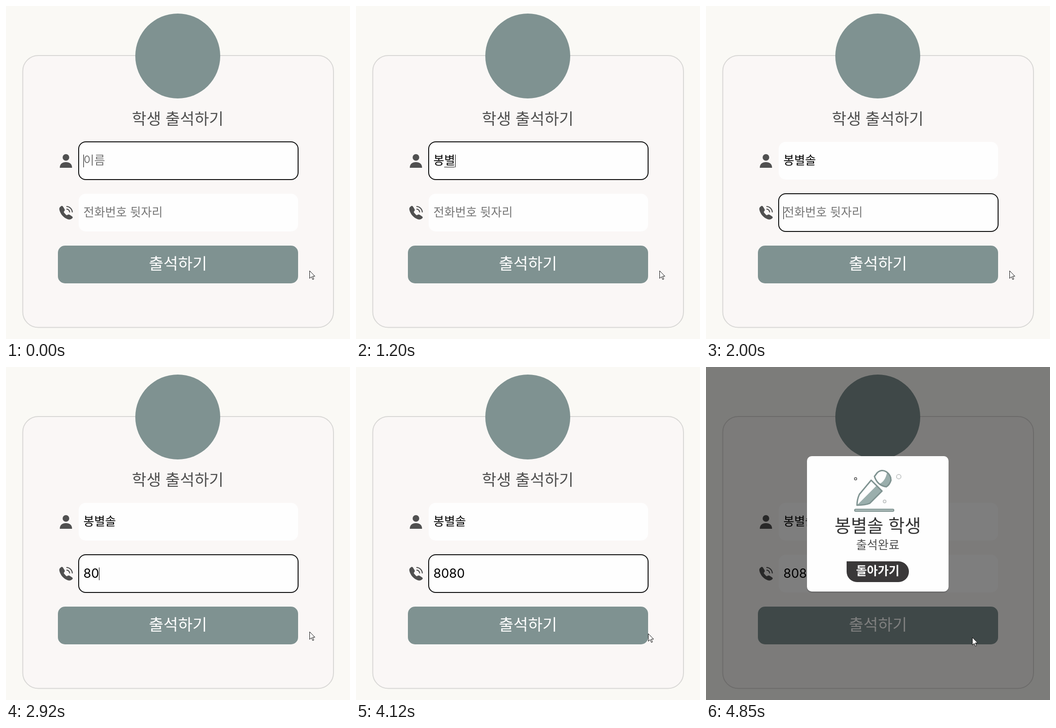
Animation of 729 by 706 pixels, one loop 5780 ms. Source, as an HTML page:

```html
<!DOCTYPE html>
<html lang="ko">
<head>
<meta charset="utf-8">
<style>
  html, body { margin: 0; width: 100%; height: 100%; overflow: hidden; background: #faf9f5; }
  svg { display: block; width: 100vw; height: 100vh; }
  text { font: 500 25px "Noto Sans CJK KR", "Noto Sans CJK", sans-serif; white-space: pre; }
  .hint { fill: #757575; }
  .digits { font: 400 26.6px Inter, sans-serif; }
  .title { font-size: 33.5px; text-anchor: middle; }
  .mid { text-anchor: middle; }
  .field { fill: #fefefe; stroke-width: 2; }
  .icon { fill: #505050; }
  .line { fill: none; stroke: #7f9391; stroke-width: 3; stroke-linejoin: round; }
</style>
</head>
<body>
<svg viewBox="0 0 729 706">
  <rect width="729" height="706" fill="#faf9f5"/>
  <rect x="35.5" y="105" width="658.5" height="576.5" rx="33" fill="#faf7f6" stroke="#d9d8d6" stroke-width="2"/>
  <circle cx="364" cy="106" r="90" fill="#7f9291"/>
  <text class="title" x="364" y="251" fill="#505050">학생 출석하기</text>

  <g class="icon">
    <circle cx="127" cy="321" r="7"/>
    <path d="M114 343C114 335 119 331 127 331S140 335 140 343Z"/>
    <path d="M116 425q3-2.500 5 .5l3 5q1.500 3-1 5-1 1 0 2.500l4 4.500q1.500 1.500 3 .5 3-2 5.500 0l4.500 3q2.500 2 .5 4-4 4-10 2-8-3-13-10-5-8-4.500-13 .5-2.500 3-4Z"/>
    <path d="M128 425A12.500 12.500 0 0 1 140.500 437.500M128 430.500A7 7 0 0 1 135 437.500" fill="none" stroke="#505050" stroke-width="2.200"/>
  </g>

  <rect id="nameField" class="field" x="154" y="288" width="465" height="80" rx="15"/>
  <rect id="phoneField" class="field" x="154" y="398" width="465" height="80" rx="15"/>
  <text id="nameHint" class="hint" x="164" y="336">이름</text>
  <text id="phoneHint" class="hint" x="164" y="446">전화번호 뒷자리</text>
  <text id="name" x="164" y="336"></text>
  <text id="phone" class="digits" x="164" y="446.500"></text>
  <rect id="underline" y="341" height="1"/>
  <rect id="caret" width="1" height="27"/>

  <rect id="button" x="110" y="508" width="509" height="80" rx="15"/>
  <text class="title" x="364.500" y="557.500" fill="#fff">출석하기</text>

  <g id="popup">
    <rect width="729" height="706" fill="#000" opacity=".5"/>
    <rect x="214" y="192" width="300" height="287" rx="10" fill="#000" opacity=".12"/>
    <rect x="214" y="189" width="300" height="287" rx="10" fill="#fefefe"/>
    <path d="M372 263 347 290Q340 292 320 293L361 252Z" fill="#9aaeac"/>
    <path d="M392 232Q395 242 383 254 374 254 367 248Q380 243 384 222Z" fill="#9aaeac"/>
    <path class="line" d="M350 240 373 263 347 289Q338 293 320 293 320 281 325 270ZM357 232 363 224Q372 216 382 222 392 229 392 240 389 250 382 254 363 251 357 232Z"/>
    <rect class="line" x="315" y="301.500" width="83" height="4.500" rx="2.200" style="fill:#aebdbb;stroke-width:2"/>
    <g fill="none" stroke="#b8bcbc" stroke-width="1.500">
      <circle cx="317" cy="237" r="2.500" stroke="#555"/>
      <circle cx="408.500" cy="232.500" r="4.700"/>
      <circle cx="378.500" cy="285" r="3"/>
    </g>
    <text class="mid" x="364" y="349.500" fill="#333" style="font-size:37.500px">봉별솔 학생</text>
    <text class="mid" x="364" y="386" fill="#505050">출석완료</text>
    <path d="M298 412H408A22 22 0 0 1 408 456H320A22 22 0 0 1 298 434Z" fill="#3a3839"/>
    <text class="mid" x="364" y="440.500" fill="#fff" style="font-weight:700">돌아가기</text>
  </g>

  <g id="cursor" fill="#fff" stroke="#111" stroke-linejoin="round">
    <path id="arrow" d="M.5.5V16.500L4.300 13 7 19 9.300 18 6.700 12H11.700Z"/>
    <path id="hand" d="M-1 2a2 2 0 0 1 4 0V8q2-1 3 .8 2-.8 3 .9 2.500-.5 2.500 2V17l-2 3.500V23.500H-.5V21L-5.500 15q-2-2.500-.5-3.300 2-.8 5 2.300ZM3 8V13M6 9V13M9 10V13"/>
  </g>
</svg>
<script>
const LOOP = 5780;
const el = id => document.getElementById(id);
const show = (id, visible) => el(id).style.display = visible ? '' : 'none';

const nameKeys = [[600, 'ㅂ'], [740, '보'], [800, '봉'], [1000, '봉ㅂ'], [1100, '봉벼'], [1200, '봉별'],
  [1400, '봉별ㅅ'], [1500, '봉별소'], [1600, '봉별솔']];
const phoneKeys = [[2730, '8'], [2920, '80'], [3120, '808'], [3260, '8080']];

const typed = (keys, t) => keys.reduce((text, [time, value]) => t >= time ? value : text, '');

function setField(id, value, focused) {
  el(id).textContent = value;
  show(id + 'Hint', !value);
  el(id + 'Field').setAttribute('stroke', focused ? '#111' : 'none');
  return value ? el(id).getComputedTextLength() : 0;
}

function draw(t) {
  const onName = t < 2000, onPhone = !onName && t < 4520;
  const nameText = typed(nameKeys, t);
  const nameWidth = setField('name', nameText, onName);
  const phoneWidth = setField('phone', typed(phoneKeys, t), onPhone);

  show('underline', onName && nameText);
  if (nameText) {
    const glyph = nameWidth / nameText.length;
    el('underline').setAttribute('x', Math.round(164 + nameWidth - glyph));
    el('underline').setAttribute('width', Math.round(glyph - 1));
  }
  const blinkedOff = (t >= 70 && t < 600) || (t >= 2530 && t < 2730) || t >= 3790;
  show('caret', !blinkedOff);
  el('caret').setAttribute('x', Math.round(164 + (onName ? nameWidth : phoneWidth)));
  el('caret').setAttribute('y', onName ? 315 : 425);

  // The pointer glides to the button in six discrete steps.
  const step = Math.max(0, Math.min(6, Math.floor((t - 4120) / 80) + 1));
  const p = 1 - (1 - step / 6) ** 2;
  const x = Math.round(643 - 79 * p), y = Math.round(561 + 12 * p);
  const done = t >= 4850, hover = x < 619 && !done;
  el('cursor').setAttribute('transform', `translate(${x} ${y})`);
  show('arrow', !hover);
  show('hand', hover);
  el('button').setAttribute('fill', hover ? '#607371' : '#7f9291');
  show('popup', done);
}

function tick() {
  draw(performance.now() % LOOP);
  requestAnimationFrame(tick);
}
tick();
</script>
</body>
</html>
```
